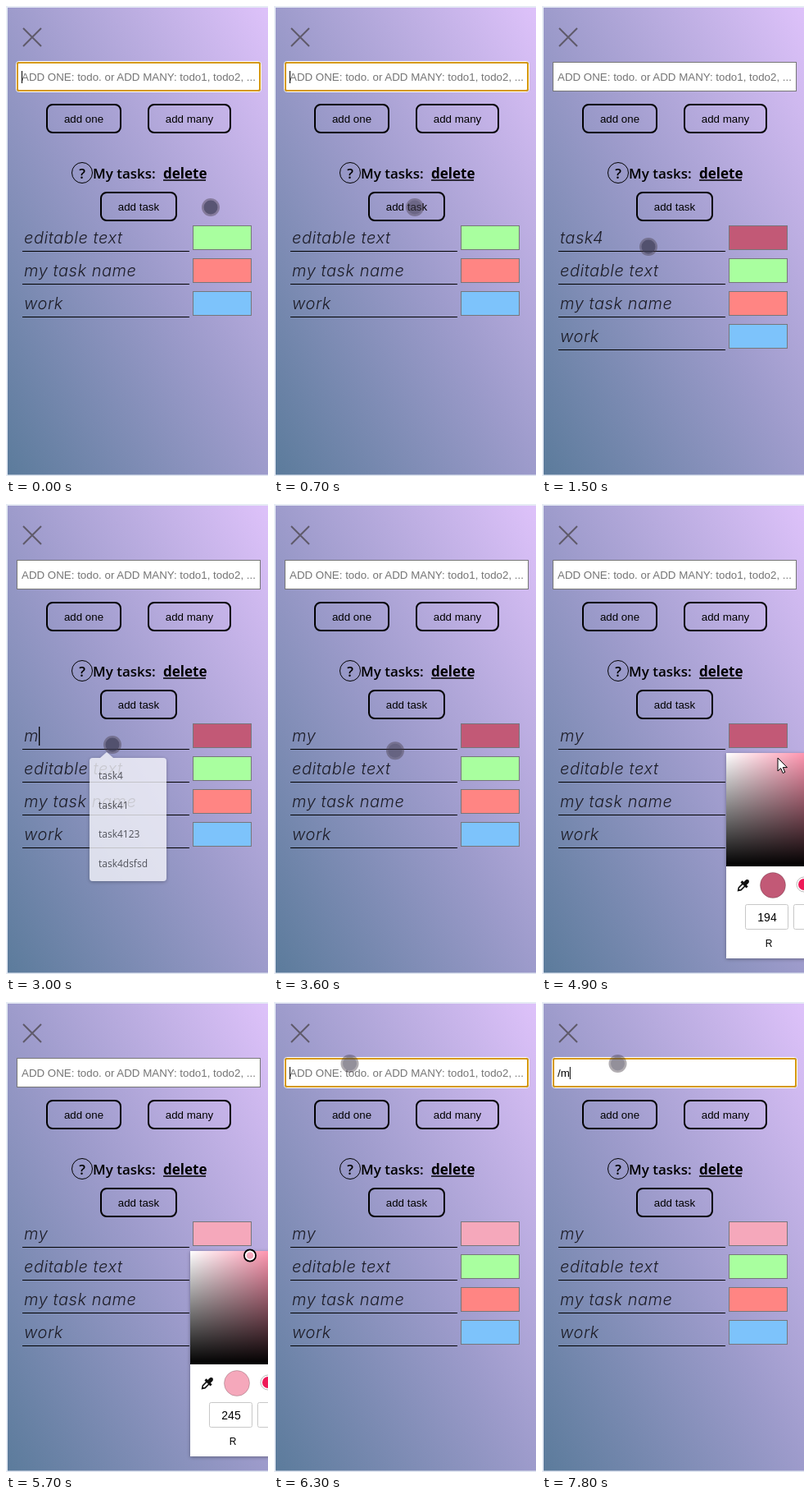
Write an HTML page that moves like this. It is 320 px wide and 572 px high and loops after 8000 ms.

```html
<!DOCTYPE html>
<html lang="en">
<head>
<meta charset="utf-8">
<title>Task list</title>
<style>
  html, body { margin: 0; width: 100%; height: 100%; overflow: hidden; }
  body { background: linear-gradient(to top right, #5b7b9b, #9d9bcb 50%, #dec2fa) 0 0 / 320px 572px no-repeat; }
  svg { display: block; font: 13.333px "Liberation Sans", Arial, sans-serif; }
  text { white-space: pre; }
  .mid { text-anchor: middle; }
  .btn rect { fill: none; stroke: #000; stroke-width: 2; }
  .title { font: 600 17px "Open Sans", "Noto Sans", sans-serif; }
  .row text { font: italic 300 20px Inter, sans-serif; letter-spacing: .55px; fill: #1d1d28; }
  .row rect { stroke: #76767a; }
  #menu text { font: 12px "Open Sans", "Noto Sans", sans-serif; fill: #444; }
  .field { fill: #fff; stroke: #c8c8c8; }
</style>
</head>
<body>
<svg width="320" height="572" viewBox="0 0 320 572">
  <defs>
    <linearGradient id="sat" gradientUnits="userSpaceOnUse" x1="225" x2="457" y1="0" y2="0">
      <stop stop-color="#fff"/><stop offset="1" stop-color="#ff0040"/>
    </linearGradient>
    <linearGradient id="val" x2="0" y2="1">
      <stop stop-opacity="0"/><stop offset="1"/>
    </linearGradient>
    <filter id="shade" x="-20%" y="-20%" width="140%" height="140%">
      <feDropShadow dx="0" dy="1" stdDeviation="2" flood-opacity=".35"/>
    </filter>
  </defs>

  <path d="M1 572V1H320M0 571.5H320" fill="none" stroke="#e6ebf4" stroke-width="2"/>
  <path d="M21 27L43 49M43 27L21 49" stroke="#5f5a6a" stroke-width="2"/>

  <rect x="13.5" y="68.5" width="297" height="35" fill="#fff" stroke="#767676"/>
  <g id="focus" fill="none">
    <rect x="12.5" y="67.5" width="299" height="37" rx="3" stroke="#fff"/>
    <rect x="14" y="69" width="296" height="34" rx="2" stroke="#d69a10" stroke-width="2"/>
  </g>
  <text id="entry" x="19" y="91"></text>
  <rect id="entryCaret" y="79" width="1" height="15"/>

  <g id="buttons" class="btn"></g>
  <circle cx="93" cy="203" r="12.5" fill="none" stroke="#000"/>
  <g class="title">
    <text class="mid" x="93" y="209.5">?</text>
    <text x="106" y="210">My tasks:</text>
    <text x="192" y="210" font-weight="700">delete</text>
    <path d="M192 212H244" stroke="#000" stroke-width="1.5"/>
  </g>

  <g id="rows"></g>
  <rect id="rowCaret" y="271" width="1.3" height="23"/>

  <g id="menu">
    <path d="M106 309H115L123 302L131 309H192Q196 309 196 313V455Q196 459 192 459H106Q102 459 102 455V313Q102 309 106 309Z" fill="#f4f4fa" filter="url(#shade)"/>
  </g>

  <g id="picker">
    <rect x="225" y="303" width="232" height="250" fill="#fff" filter="url(#shade)"/>
    <rect x="225" y="303" width="232" height="138" fill="url(#sat)"/>
    <rect x="225" y="303" width="232" height="138" fill="url(#val)"/>
    <g transform="translate(246 464) rotate(45)">
      <path d="M-2 -1V6L0 9L2 6V-1" fill="#fff" stroke="#111" stroke-width="1.6"/>
      <path d="M-5 -3H5V0H-5ZM-2.5 -3V-7Q0 -11 2.5 -7V-3Z" fill="#111"/>
    </g>
    <circle id="sample" cx="282" cy="464" r="15.5" stroke="#0003"/>
    <circle cx="320" cy="463" r="9" fill="#fff" stroke="#bbb"/>
    <circle cx="320" cy="463" r="7" fill="#ee1a58"/>
    <rect class="field" x="248.5" y="487.5" width="52" height="30" rx="2"/>
    <rect class="field" x="307.5" y="487.5" width="52" height="30" rx="2"/>
    <text id="red" class="mid" x="275" y="508" font-size="14"></text>
    <text class="mid" x="277" y="539" font-size="12">R</text>
    <g id="ring" fill="none">
      <circle r="7" stroke="#000" stroke-width="2"/>
      <circle r="5.2" stroke="#fff" stroke-width="1.8"/>
    </g>
  </g>

  <path id="arrow" d="M0 0V16L3.7 12.6L6.2 18.5L8.8 17.4L6.3 11.6H11.4Z" fill="#fff" stroke="#000"/>
  <g id="touch">
    <circle r="11" fill="#463c46" fill-opacity=".42"/>
    <circle id="core" r="8.5" fill="#3c3c58"/>
  </g>
</svg>
<script>
const $ = id => document.getElementById(id);
const show = (id, on) => $(id).setAttribute('opacity', +on);
const place = (id, [x, y]) => $(id).setAttribute('transform', `translate(${x} ${y})`);
const within = (t, a, b) => t >= a && t < b;
// last value whose start time has passed
const pick = (t, steps) => steps.filter(s => s[0] <= t).pop()[1];

// linear path through [time, x, y] points
function along(t, pts) {
  const i = pts.findIndex(p => p[0] > t);
  if (i < 0) return pts[pts.length - 1].slice(1);
  if (!i) return pts[0].slice(1);
  const [a, b] = [pts[i - 1], pts[i]], k = (t - a[0]) / (b[0] - a[0]);
  return [1, 2].map(n => a[n] + (b[n] - a[n]) * k);
}

$('buttons').innerHTML = [[50, 120, 90, 'add one'], [174, 120, 100, 'add many'], [116, 227, 92, 'add task']]
  .map(([x, y, w, s]) => `<rect x="${x}" y="${y}" width="${w}" height="34" rx="7"/>
    <text class="mid" x="${x + w / 2}" y="${y + 22}">${s}</text>`).join('');

$('rows').innerHTML = [['task4', '#c25976'], ['editable text', '#a9ff9f'], ['my task name', '#ff8583'], ['work', '#7dc3fb']]
  .map(([s, c], i) => `<g class="row" transform="translate(0 ${i * 40})">
    <text x="22" y="289">${s}</text><path d="M20 298.5H224" stroke="#000"/>
    <rect x="228.5" y="267.5" width="71" height="29" fill="${c}"/></g>`).join('');
const newRow = $('rows').firstElementChild;
const newText = newRow.querySelector('text'), swatch = newRow.querySelector('rect');

$('menu').innerHTML += ['task4', 'task41', 'task4123', 'task4dsfsd']
  .map((s, i) => `<text x="113" y="${335 + i * 35.7}">${s}</text>`).join('');

const touchPath = [[300, 250, 245], [700, 172, 245], [900, 168, 246], [1200, 130, 293],
  [3500, 130, 293], [3900, 202, 322], [4000, 202, 322], [4200, 250, 288]];
const arrowPath = [[4500, 266, 284], [4900, 288, 309], [5200, 291, 312]];
const ringPath = [[5200, 291, 312], [5400, 298, 308.5]];
const menuFade = [[1500, 0, 0], [1700, .93, 0], [2900, .93, 0], [3000, .8, 0], [3200, 0, 0]];

function pickedColor([x, y]) {
  const s = (x - 225) / 232, v = 255 * (1 - (y - 303) / 138);
  return [v, v * (1 - s), v * (1 - s * .75)].map(Math.round);
}

function draw(t) {
  const added = t >= 800, picked = t >= 5200;

  const entry = pick(t, [[0, ''], [7200, '/'], [7700, '/m']]);
  const focused = t < 800 || t >= 6300;
  show('focus', focused);
  $('entry').textContent = entry || 'ADD ONE: todo. or ADD MANY: todo1, todo2, ...';
  $('entry').setAttribute('fill', entry ? '#000' : '#757575');
  $('entryCaret').setAttribute('x', 19 + (entry && $('entry').getComputedTextLength()));
  show('entryCaret', focused && !within(t, 6800, 7200) && !within(t, 7700, 7800));

  place('rows', [0, added ? 0 : -40]);
  newRow.setAttribute('visibility', added ? 'visible' : 'hidden');
  newText.textContent = pick(t, [[0, 'task4'], [1900, 'ta'], [2000, ''], [3000, 'm'], [3100, 'my']]);
  $('rowCaret').setAttribute('x', 22 + (newText.textContent && newText.getComputedTextLength()));
  show('rowCaret', within(t, 1600, 3600) || within(t, 4100, 4500));
  show('menu', along(t, menuFade)[0]);

  const ring = along(t, ringPath);
  const rgb = picked ? pickedColor(ring) : [194, 89, 118];
  const color = `rgb(${rgb})`;
  swatch.setAttribute('fill', color);
  $('sample').setAttribute('fill', color);
  $('red').textContent = rgb[0];
  show('picker', within(t, 4500, 6200));
  show('ring', picked);
  place('ring', ring);

  show('arrow', within(t, 4500, 5200));
  place('arrow', along(t, arrowPath));
  show('touch', t < 4200 || t >= 6200);
  place('touch', t < 4200 ? along(t, touchPath) : [92.5, 75]);
  const pressed = t < 100 || within(t, 800, 900) || within(t, 1300, 3600);
  $('core').setAttribute('fill-opacity', pressed ? .6 : .25);
}

const start = performance.now();
function frame() {
  const t = (performance.now() - start) % 8000;
  draw(Math.floor(t / 100) * 100);
  requestAnimationFrame(frame);
}
frame();
</script>
</body>
</html>
```
